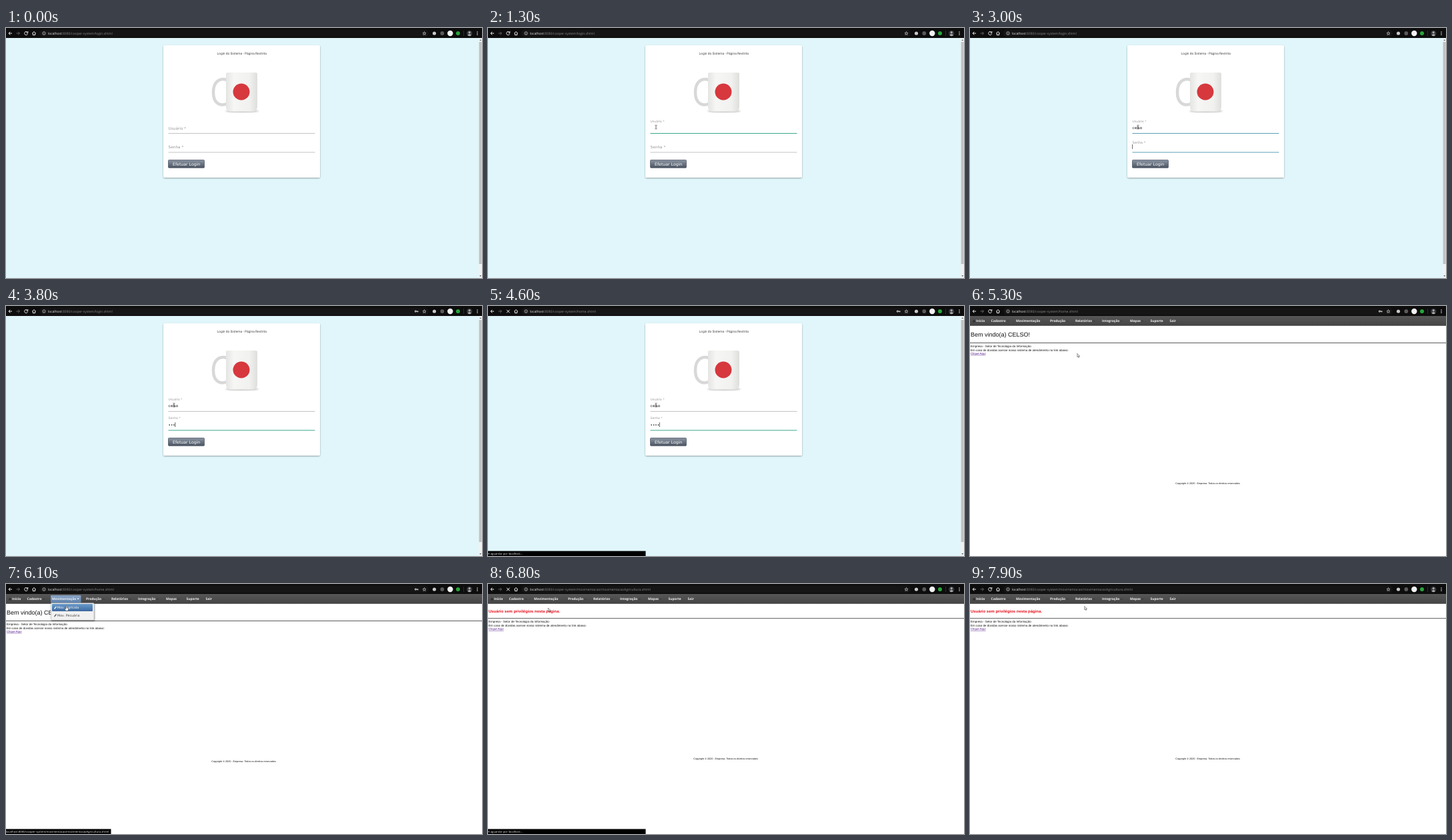
An HTML page for the animation above (8 s loop, 714x376 px).

```html
<!DOCTYPE html>
<html lang="pt">
<head>
<meta charset="utf-8">
<title>Login</title>
<style>
html, body { margin: 0; width: 100%; height: 100%; overflow: hidden; background: #fff; }
svg { display: block; width: 714px; height: 376px; text-rendering: geometricPrecision; }
text { white-space: pre; }
.ui { font-family: "Open Sans", sans-serif; }
.form { font-family: "DejaVu Sans", sans-serif; }
.page { font-family: "Liberation Sans", Arial, sans-serif; font-size: 4.46px; }
.line { fill: none; stroke: #eee; stroke-width: 1; }
</style>
</head>
<body>
<svg viewBox="0 0 714 376">
  <defs>
    <linearGradient id="btn" x2="0" y2="1"><stop stop-color="#8b95a2"/><stop offset="1" stop-color="#4a5362"/></linearGradient>
    <linearGradient id="blue" x2="0" y2="1"><stop stop-color="#6b9bcb"/><stop offset="1" stop-color="#3c689e"/></linearGradient>
    <linearGradient id="head" x2="0" y2="1"><stop stop-color="#8aa5c6"/><stop offset="1" stop-color="#5d80ab"/></linearGradient>
    <linearGradient id="bar" x2="0" y2="1"><stop stop-color="#575757"/><stop offset="1" stop-color="#444"/></linearGradient>
    <linearGradient id="cup"><stop stop-color="#e4e4e2"/><stop offset=".25" stop-color="#f6f6f4"/><stop offset=".75" stop-color="#f1f1ef"/><stop offset="1" stop-color="#dededc"/></linearGradient>
    <filter id="soft" x="-20%" y="-20%" width="140%" height="140%"><feGaussianBlur stdDeviation="1.2"/></filter>
  </defs>

  <g id="login">
    <rect width="714" height="376" fill="#e0f6fa"/>
    <rect x="236" y="27" width="235" height="199" rx="2" fill="#000" opacity=".35" filter="url(#soft)"/>
    <rect x="236" y="26" width="235" height="199" rx="1.5" fill="#fff"/>
    <text x="353.7" y="39.6" text-anchor="middle" font-family="Roboto, sans-serif" font-size="4.88" fill="#444">Login do Sistema - Página Restrita</text>
    <ellipse cx="354" cy="125" rx="25" ry="2" fill="#999" opacity=".6" filter="url(#soft)"/>
    <path d="M331 78C322 75 311 79 311 97C311 114 322 118 331 114" fill="none" stroke="#d8d8d8" stroke-width="4.5"/>
    <path d="M330 69Q330 67 333 67H374Q377 67 377 69V118Q377 125.500 370 125.500H337Q330 125.500 330 118Z" fill="url(#cup)"/>
    <circle cx="353" cy="96" r="12.500" fill="#d6383e"/>
    <g class="form">
      <text id="userLabel" x="243.6"  fill="#999">Usuário *</text>
      <text id="passLabel" x="243.6" fill="#999">Senha *</text>
      <path id="userLine" d="M243.500 158.500H463.500"/>
      <path id="passLine" d="M243.500 187H463.500"/>
      <text id="user" x="243.6" y="152.300" font-size="5.7" fill="#222"></text>
      <text id="pass" x="243.6" y="181" font-size="5.7" fill="#111"></text>
      <rect id="caret" width=".7" height="7" fill="#222"/>
      <rect x="243.500" y="198.500" width="54" height="11.800" rx="1" fill="url(#btn)" stroke="#485060" stroke-width=".7"/>
      <text x="250" y="206.800" font-size="6.2" fill="#fff">Efetuar Login</text>
    </g>
    <rect x="709" y="15" width="5" height="361" fill="#f1f1f1"/>
    <rect x="709.600" y="21" width="4" height="334" fill="#c1c1c1"/>
    <path d="M710.300 19L711.700 17.200L713 19ZM710.300 372L711.700 374L713 372Z" fill="#555"/>
  </g>

  <g id="site">
    <rect width="714" height="376" fill="#fff"/>
    <g class="page">
      <text id="hello" x="1" y="45.700" font-size="9" style="font-size:9px" fill="#111">Bem vindo(a) CELSO!</text>
      <text id="denied" x="1" y="42.700" style="font-size:5.96px;font-weight:bold" fill="#e8101c">Usuário sem privilégios nesta página.</text>
      <g id="body" fill="#111">
        <path d="M0 55.500H714" stroke="#333" stroke-width=".8"/>
        <text x="1" y="62.300">Empresa - Setor de Tecnologia da Informação</text>
        <text x="1" y="67.600">Em caso de dúvidas acesse nosso sistema de atendimento no link abaixo:</text>
        <text x="1" y="72.800" fill="#551a8b" text-decoration="underline">Clique Aqui</text>
        <text x="356.500" y="267.500" text-anchor="middle" style="font-size:3.72px">Copyright © 2020 - Empresa. Todos os direitos reservados</text>
      </g>
    </g>
    <rect y="15" width="714" height="14.800" fill="url(#bar)"/>
    <rect id="active" x="67" y="17" width="45.500" height="11.500" rx="1" fill="url(#head)"/>
    <path d="M4 22.500L6 20.500L8 22.500V24.500H4Z" fill="#333"/>
    <g id="menu" class="ui" font-size="4.9" font-weight="bold" fill="#f2f2f2"></g>
    <path id="mark" d="M106.500 21.600H109.700L108.100 23.600Z" fill="#fff"/>
    <g id="drop" class="form" font-size="4.84">
      <rect x="68" y="30" width="65" height="26" fill="#000" opacity=".4" filter="url(#soft)"/>
      <rect x="67.500" y="28.700" width="64.500" height="25.500" rx="1" fill="#f1f1f1" stroke="#bbb" stroke-width=".6"/>
      <rect id="row" x="69" y="30" width="61" height="11" rx="1" fill="url(#blue)"/>
      <path id="pen" d="M72.500 37.500L75.500 34" stroke-width="1.2"/>
      <path d="M72.500 49L75.500 45.500" stroke="#555" stroke-width="1.2"/>
      <text id="crop" x="77" y="37.400">Mov. Agrícola</text>
      <text x="77" y="49" fill="#444">Mov. Pecuária</text>
    </g>
  </g>

  <g class="ui">
    <rect width="714" height="15" fill="#0d0d0d"/>
    <rect x="50" y="2.300" width="584" height="11.200" rx="5.600" fill="#151515"/>
    <g class="line">
      <path d="M9 8H4M6.300 5.700L4 8L6.300 10.300"/>
      <path d="M15.500 8H20.500M18.200 5.700L20.500 8L18.200 10.300" stroke="#666"/>
      <path id="reload" d="M32 6.300A2.500 2.500 0 1 0 32.600 8.500M32.800 5V7.200H30.600"/>
      <path id="stop" d="M28 5.700L32.600 10.300M32.600 5.700L28 10.300"/>
      <path d="M39.300 8L42 5.500L44.700 8M40.300 7.500V10.500H43.700V7.500"/>
      <circle cx="57" cy="8" r="2.300" stroke-width=".6"/>
      <path d="M57 7.700V9.400M57 6.500V7" stroke-width=".6"/>
      <path id="key" d="M615.500 8H618.500M617.700 8V9.300M615.500 8A1.100 1.100 0 1 0 613.300 8A1.100 1.100 0 1 0 615.500 8"/>
      <path d="M627.500 5.500L628.200 7.300L630 7.400L628.600 8.600L629.100 10.400L627.500 9.400L625.900 10.400L626.400 8.600L625 7.400L626.800 7.300Z" stroke-width=".6"/>
      <path d="M686.500 4V12" stroke="#444" stroke-width=".6"/>
    </g>
    <circle cx="642.500" cy="8" r="2.600" fill="#c9c9c9"/>
    <circle cx="654.300" cy="8" r="2.900" fill="#5a5a5a"/>
    <circle cx="666.300" cy="8" r="4.200" fill="#f2f2f2"/>
    <circle cx="678" cy="8" r="3" fill="#27a53a"/>
    <circle cx="695.200" cy="8" r="4.200" fill="#35383d"/>
    <path d="M692.300 11Q695.200 6.800 698.100 11Q695.200 13.300 692.300 11" fill="#aaa"/>
    <circle cx="695.200" cy="6.700" r="1.600" fill="#aaa"/>
    <path d="M707 5.300V10.800" stroke="#eee" stroke-width="1.200" stroke-dasharray="1.200 .95"/>
    <text x="63" y="9.700" font-size="4.95" fill="#eee">localhost<tspan id="path" fill="#8b8b8b"></tspan></text>
    <rect id="statusBox" y="368.500" height="7.500"/>
    <text id="status" x="0" y="373.900" font-size="4.23" fill="#eee"></text>
  </g>

  <g id="cursor">
    <path id="beam" d="M-1.500 -2.800H-.4M.4 -2.800H1.500M0 -2.600V2.600M-1.500 2.800H-.4M.4 2.800H1.500" stroke="#222" stroke-width=".7"/>
    <path id="arrow" d="M0 0V5.200L1.200 4.100L2 6L2.900 5.600L2.100 3.800H3.700Z" fill="#fff" stroke="#222" stroke-width=".5"/>
    <path id="hand" d="M-.7 -3Q0 -3.700 .6 -3V-.7L2.700 -.2Q3.300 0 3.200 .8L2.600 3.800H-.7L-2.500 1.200Q-2.500 .2 -1.700 .5L-.7 1.200Z" fill="#fff" stroke="#222" stroke-width=".5"/>
  </g>
</svg>
<script>
const $ = id => document.getElementById(id);
const show = (id, on) => $(id).style.display = on ? '' : 'none';
const set = (id, attrs) => { for (const k in attrs) $(id).setAttribute(k, attrs[k]); };
const within = (t, a, b) => t >= a && t < b;
const count = (times, t) => times.filter(k => t >= k).length;
const easeOut = (t, a, b) => {
  const x = Math.min(1, Math.max(0, (t - a) / (b - a)));
  return 1 - (1 - x) ** 2;
};

const items = [['Início', 9], ['Cadastro', 31.6, 57], ['Movimentação', 69], ['Produção', 120, 146.5],
  ['Relatórios', 158, 186], ['Integração', 198, 227.5], ['Mapas', 240, 259], ['Suporte', 270.5], ['Sair', 299.6]];
$('menu').innerHTML = items.map(([name, x, tip]) => `<text x="${x}" y="24.2">${name}</text>` +
  (tip ? `<path d="M${tip - 1.3} 22H${tip + 1.3}L${tip} 23.6Z" fill="#333"/>` : '')).join('');

const root = ':8080/cooper-system/';
const crops = root + 'movimentacao/movimentacaoAgricultura.xhtml';
const name = 'celso';
const nameKeys = [1700, 1900, 2200, 2500, 2600];
const passKeys = [3400, 3500, 3700, 4000];

// time, x, y
const route = [[5000, 252, 149], [5500, 112, 30], [5700, 95, 22], [5850, 91, 25], [6000, 90.5, 36.5],
  [6700, 90.5, 36.5], [7100, 89, 34], [7300, 40, 46], [7600, 310, 46], [7850, 171.8, 33.5]];
function place(t) {
  const i = route.findIndex(p => p[0] > t);
  if (i === 0) return route[0].slice(1);
  if (i < 0) return route.at(-1).slice(1);
  const [a, x, y] = route[i - 1], [b, u, v] = route[i];
  const k = (t - a) / (b - a), e = k * k * (3 - 2 * k);
  return [x + (u - x) * e, y + (v - y) * e];
}

function field(id, lift, focus, top, bottom) {
  set(id + 'Label', { y: bottom + (top - bottom) * lift, 'font-size': 5.75 - 1.2 * lift });
  set(id + 'Line', {
    stroke: focus <= 0 ? '#aaa' : focus >= 1 ? '#3aa78d' : '#5b9fba',
    'stroke-width': focus > 0 ? 1.2 : .7
  });
}

function drawLogin(t) {
  const first = easeOut(t, 780, 1000), second = easeOut(t, 2900, 3150);
  field('user', first, first - second, 141.7, 152.6);
  field('pass', second, second, 169.9, 181);
  $('user').textContent = name.slice(0, count(nameKeys, t));
  $('pass').textContent = '•'.repeat(count(passKeys, t));
  const id = second > 0 ? 'pass' : 'user';
  show('caret', t >= 1400);
  set('caret', { x: 243.4 + $(id).getComputedTextLength(), y: second > 0 ? 175 : 146.7 });
}

function drawSite(t) {
  const denied = t >= 6700, open = within(t, 5600, 6700), hover = within(t, 5900, 6700);
  show('hello', !denied);
  show('denied', denied);
  set('body', { transform: `translate(0 ${denied ? -3.8 : 0})` });
  for (const id of ['active', 'drop', 'mark']) show(id, open);
  show('row', hover);
  set('crop', { fill: hover ? '#fff' : '#444' });
  set('pen', { stroke: hover ? '#fff' : '#555' });
}

function drawBrowser(t) {
  const busy = within(t, 4400, 4800) || within(t, 6300, 7100);
  show('stop', busy);
  show('reload', !busy);
  show('key', within(t, 3800, 6700));
  $('path').textContent = t < 4400 ? root + 'login.xhtml' : t < 6700 ? root + 'home.xhtml' : crops;
  const wait = within(t, 4400, 5000) || within(t, 6300, 7100), link = within(t, 5900, 6300);
  $('status').textContent = wait ? 'A aguardar por localhost...' : link ? 'localhost' + crops : '';
  set('statusBox', { width: wait ? 236.5 : link ? 157.5 : 0 });
}

function drawCursor(t) {
  const [x, y] = place(t), hand = within(t, 5600, 6700);
  show('cursor', t >= 800);
  set('cursor', { transform: `translate(${x} ${y})` });
  show('beam', t < 5000);
  show('hand', hand);
  show('arrow', t >= 5000 && !hand);
}

function frame() {
  const t = performance.now() % 8000;
  show('login', t < 4700);
  show('site', t >= 4700);
  if (t < 4700) drawLogin(t); else drawSite(t);
  drawBrowser(t);
  drawCursor(t);
  requestAnimationFrame(frame);
}
frame();
</script>
</body>
</html>
```
